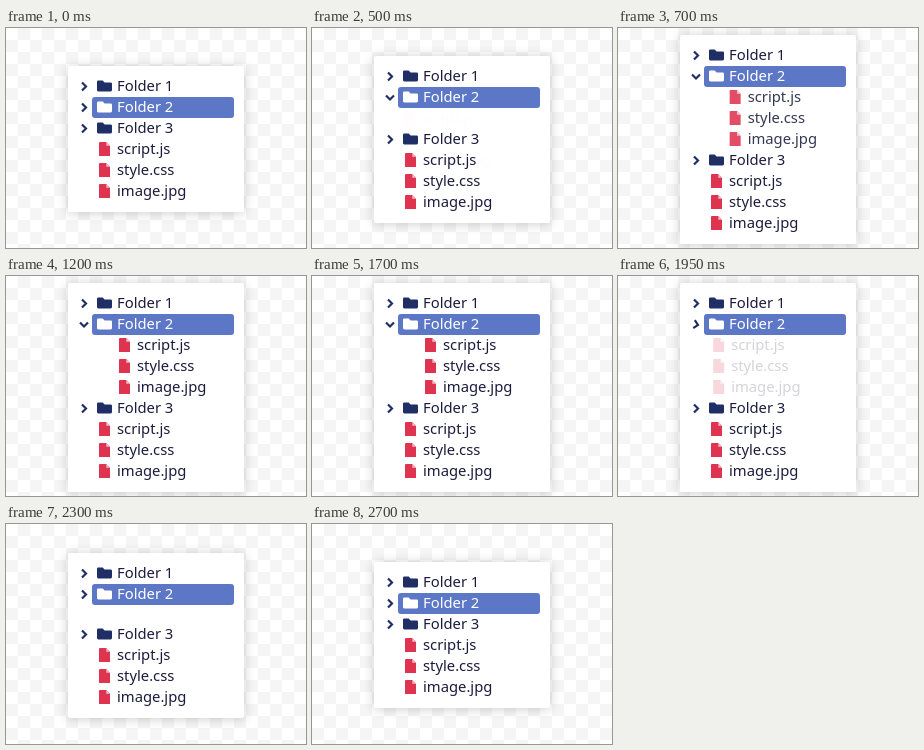
Recreate the animation shown at these times as an HTML page. Size 300 by 220 pixels, loop 2.75 s.

```html
<!DOCTYPE html>
<html lang="en">
<head>
<meta charset="utf-8">
<title>Folder tree</title>
<style>
html, body { margin: 0; width: 100%; height: 100%; overflow: hidden; }
body {
  position: relative;
  background: repeating-conic-gradient(#f5f5f5 0 25%, #fff 0 50%) 0 0 / 24px 24px;
}
#card {
  position: absolute; left: 62px; width: 176px; border-radius: 2px;
  background: #fff; box-shadow: 0 1px 12px rgba(0, 0, 0, .2);
}
svg { position: absolute; left: 0; top: 0; }
text { font: 400 14.8px "Noto Sans", "Open Sans", sans-serif; fill: #1b1c3d; }
.folder { fill: #1f2f66; }
.arrow { fill: none; stroke: #1f2f66; stroke-width: 2.2; }
.open text, .open .folder { fill: #fff; }
</style>
</head>
<body>
<div id="card"></div>
<svg width="300" height="220" viewBox="0 0 300 220">
  <defs>
    <path id="folder" d="M91 -4.7q0 -1.3 1.3 -1.3h4.4l1.9 1.9h6.1q1.3 0 1.3 1.3v6.4q0 1.4 -1.3 1.4h-12.4q-1.3 0 -1.3 -1.4z"/>
    <g id="file">
      <path d="M94 -7.5h6.3l3.7 3.7v9.7q0 .6 -.6 .6h-9.8q-.6 0 -.6 -.6v-12.4q0 -1 1 -1z" fill="#df344f"/>
      <path d="M100.3 -7.5v3.7h3.7z" fill="#f6bdc7"/>
    </g>
  </defs>
  <g id="top"></g>
  <g id="kids"></g>
  <g id="bottom"></g>
</svg>
<script>
const LOOP = 2750, ROW = 21, SLIDE = 22;
const $ = id => document.getElementById(id);
const files = ['script.js', 'style.css', 'image.jpg'];

const label = name => `<text x="111" y="4.5">${name}</text>`;
const folder = (name, y, open = false) => `
  <g transform="translate(0 ${y})" class="${open ? 'open' : ''}">
    ${open ? '<rect x="86" y="-10.5" width="142" height="21" rx="3" fill="#5c77c6"/>' : ''}
    <g transform="translate(78 0)"><path class="arrow" d="M-2 -4L2 0L-2 4"/></g>
    <use href="#folder" class="folder"/>${label(name)}
  </g>`;
const fileList = (y, indent) => files.map((name, i) => `
  <g transform="translate(${indent} ${y + i * ROW})">
    <use href="#file"/>${label(name)}
  </g>`).join('');

$('top').innerHTML = folder('Folder 1', 58.5) + folder('Folder 2', 79.5, true);
$('kids').innerHTML = fileList(100.5, 20);
$('bottom').innerHTML = folder('Folder 3', 100.5) + fileList(121.5, 0);
const arrow = document.querySelector('.open .arrow');

const span = (t, start, length) => Math.min(1, Math.max(0, (t - start) / length));
const smooth = p => (1 - Math.cos(Math.PI * p)) / 2;
const out = (p, power = 3) => 1 - (1 - p) ** power;
const move = (id, x, y) => $(id).setAttribute('transform', `translate(${x} ${y})`);

function draw(now) {
  const t = now % LOOP;
  const grow = Math.round(3 * ROW * (smooth(span(t, 385, 300)) - smooth(span(t, 2112, 300))));
  const enter = span(t, 500, 400), leave = out(span(t, 1840, 260));
  const turn = smooth(span(t, 370, 125)) - smooth(span(t, 1835, 150));
  const up = Math.floor(grow / 2);  // whole pixels keep the rows crisp

  $('card').style.top = 38 - up + 'px';
  $('card').style.height = 146 + grow + 'px';
  move('top', 0, -up);
  move('bottom', 0, grow - up);
  move('kids', SLIDE * (out(enter, 4) - leave - 1), -up);
  $('kids').setAttribute('opacity', out(enter) - leave);
  arrow.setAttribute('transform', `rotate(${90 * turn})`);
  requestAnimationFrame(draw);
}
draw(0);
</script>
</body>
</html>
```
